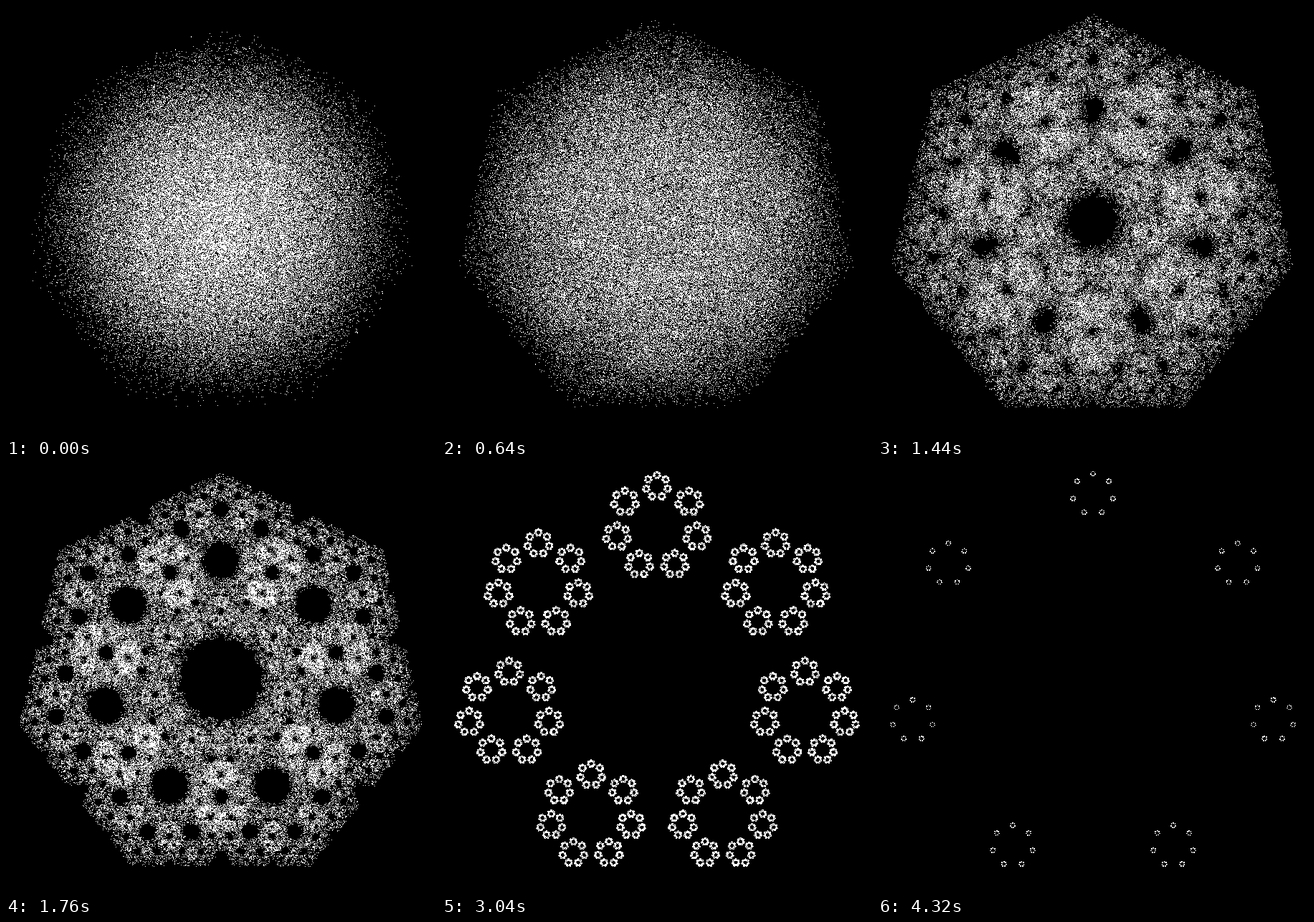
An HTML page with a canvas for the animation above (4.4 s loop, 600 by 600 pixels).

```html
<!DOCTYPE html>
<html lang="en">
<head>
<meta charset="utf-8">
<title>Heptagon chaos game</title>
<style>
  html, body { margin: 0; width: 100%; height: 100%; overflow: hidden; background: #000; }
  canvas { display: block; width: 600px; height: 600px; image-rendering: pixelated; }
</style>
</head>
<body>
<canvas width="600" height="600"></canvas>
<script>
  const SIZE = 600, CENTER = 300, RADIUS = 290, SIDES = 7;
  const STEPS = 55, STEP_MS = 80, POINTS = 100000, SETTLE = 30;

  const ctx = document.querySelector('canvas').getContext('2d');
  const image = ctx.createImageData(SIZE, SIZE);
  const pixels = new Uint32Array(image.data.buffer);

  const corners = Array.from({ length: SIDES }, (_, i) => {
    const angle = i * 2 * Math.PI / SIDES;
    return [CENTER + RADIUS * Math.sin(angle), CENTER - RADIUS * Math.cos(angle)];
  });

  function seededRandom(seed) {
    return () => {
      seed = (seed + 0x6D2B79F5) | 0;
      let t = Math.imul(seed ^ (seed >>> 15), 1 | seed);
      t = (t + Math.imul(t ^ (t >>> 7), 61 | t)) ^ t;
      return ((t ^ (t >>> 14)) >>> 0) / 4294967296;
    };
  }

  // Each jump covers a fixed share of the way to a random corner.
  function draw(step) {
    const random = seededRandom(step * 7919 + 5);
    const jump = 0.35 + step * 0.01;
    let x = CENTER, y = CENTER;
    pixels.fill(0xFF000000);
    for (let i = -SETTLE; i < POINTS; i++) {
      const [cx, cy] = corners[Math.floor(random() * SIDES)];
      x += (cx - x) * jump;
      y += (cy - y) * jump;
      if (i >= 0) pixels[Math.floor(y) * SIZE + Math.floor(x)] = 0xFFFFFFFF;
    }
    ctx.putImageData(image, 0, 0);
  }

  const start = performance.now();
  let shown = -1;

  function tick() {
    const step = Math.floor((performance.now() - start) / STEP_MS) % STEPS;
    if (step !== shown) draw(shown = step);
    requestAnimationFrame(tick);
  }
  tick();
</script>
</body>
</html>
```
